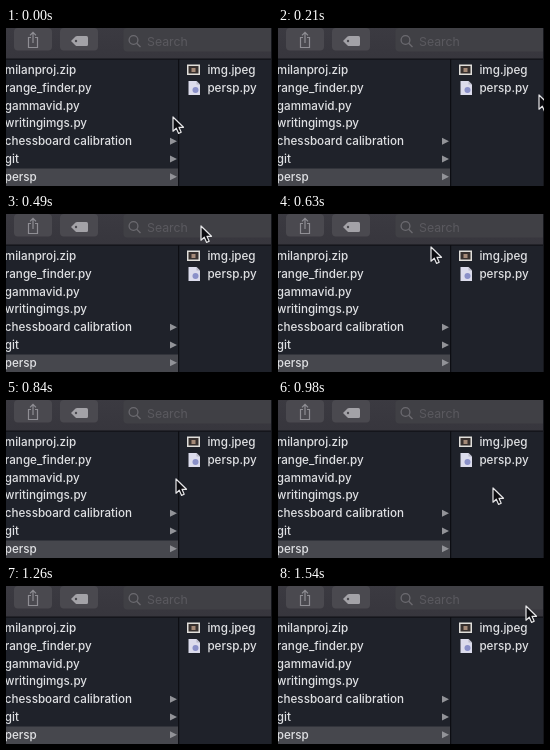
These frames come from a looping animation (266 px wide and 158 px high, 1610 ms). An HTML page:

```html
<!DOCTYPE html>
<html lang="en">
<head>
<meta charset="utf-8">
<title>File browser</title>
<style>
  html, body { margin: 0; width: 100%; height: 100%; overflow: hidden; background: #1f222a; }
  svg { display: block; width: 266px; height: 158px; }
  text { font: 500 11.65px Inter, Roboto, sans-serif; fill: #dfe0e3; white-space: pre; }
  .hint { font-size: 12.3px; font-weight: 400; fill: #5a595f; }
  .button { fill: #4a494f; }
  .line { fill: none; stroke: #8f8e94; stroke-width: 1.2; }
</style>
</head>
<body>
<svg viewBox="0 0 266 158">
  <defs>
    <linearGradient id="bar" x2="0" y2="1">
      <stop stop-color="#3b3a41"/>
      <stop offset="1" stop-color="#37363d"/>
    </linearGradient>
  </defs>
  <rect width="266" height="158" fill="#1f222a"/>

  <g id="toolbar">
    <rect width="266" height="31" fill="url(#bar)"/>
    <rect y="30.5" width="266" height="1.2" fill="#101116"/>
    <rect class="button" x="8" width="38" height="22.5" rx="4"/>
    <rect class="button" x="54" width="38" height="22.5" rx="4"/>
    <path class="line" d="M25 9.5H22.5V19.5H31.5V9.5H29M27 15V4.5M24 7.3L27 4.3L30 7.3"/>
    <path d="M65 13L69.5 8.6Q70.2 8 71 8H80.5Q82 8 82 9.5V16.5Q82 18 80.5 18H71Q70.2 18 69.5 17.4Z" fill="#a3a2a7"/>
    <circle cx="70" cy="13" r="1.2" fill="#4a494f"/>
    <rect x="117.5" width="160" height="23.5" rx="4" fill="#404045"/>
    <g fill="none" stroke="#6b6a70" stroke-width="1.3">
      <circle cx="127.5" cy="12" r="4.4"/>
      <path d="M130.7 15.2L134.5 19"/>
    </g>
    <text class="hint" x="141" y="17.7">Search</text>
  </g>

  <rect y="140.5" width="172" height="17.5" fill="#46474d"/>
  <rect x="172" y="31" width="1.2" height="127" fill="#0d0e13"/>
  <g id="rows"></g>

  <g id="files">
    <rect x="181" y="36.5" width="13" height="10.5" fill="#e0deda"/>
    <rect x="182.5" y="38" width="10" height="7.5" fill="#37302e"/>
    <rect x="185.5" y="40" width="4" height="4" fill="#a58a78"/>
    <path d="M182.5 53H190.5L194 56.5V67H182.5Z" fill="#dcdcec"/>
    <path d="M190.5 53V56.5H194Z" fill="#b9b9c8"/>
    <circle cx="189.5" cy="62" r="3" fill="#8a90c8"/>
    <text x="201.4" y="46">img.jpeg</text>
    <text x="201.4" y="63.8">persp.py</text>
  </g>
  <rect x="265" width="1" height="158" fill="#15161b"/>

  <path id="cursor" d="M0 0V14.2L3.3 11.2L5.6 16.4L8.2 15.3L6 10.3H10.5Z"
        fill="#0c0c10" stroke="#e6e6e8" stroke-width="1.2" stroke-linejoin="round"/>
</svg>
<script>
const NS = 'http://www.w3.org/2000/svg';
const rows = document.getElementById('rows');
const names = ['milanproj.zip', 'range_finder.py', 'gammavid.py', 'writingimgs.py',
  'chessboard calibration', 'git', 'persp'];

function add(tag, attrs, text = '') {
  const node = document.createElementNS(NS, tag);
  for (const key in attrs) node.setAttribute(key, attrs[key]);
  node.textContent = text;
  rows.append(node);
}

names.forEach((name, i) => {
  const y = 46 + i * 17.8;
  add('text', { x: -1.2, y }, name);
  if (!name.includes('.')) {
    add('path', { d: `M164 ${y - 7.5}L171 ${y - 4}L164 ${y - 0.5}Z`, fill: '#929398' });
  }
});

// Pointer tip, one position per 70 ms step.
const STEP = 70;
const path = [
  [167, 89], [195, 100], [236, 93], [261, 67], [262, 44], [251, 25], [226, 14], [195, 12],
  [170, 19], [153, 33], [151, 50], [156, 66], [170, 79], [192, 86], [215, 88], [235, 86],
  [249, 78], [262, 66], [268, 52], [270, 42], [267, 33], [259, 26], [248, 20]
];
const frames = [...path, path[path.length - 1]].map(([x, y], i) => ({
  transform: `translate(${x}px, ${y}px)`,
  offset: i / path.length,
  easing: 'steps(1, end)'
}));
document.getElementById('cursor').animate(frames, {
  duration: STEP * path.length,
  iterations: Infinity
});
</script>
</body>
</html>
```
